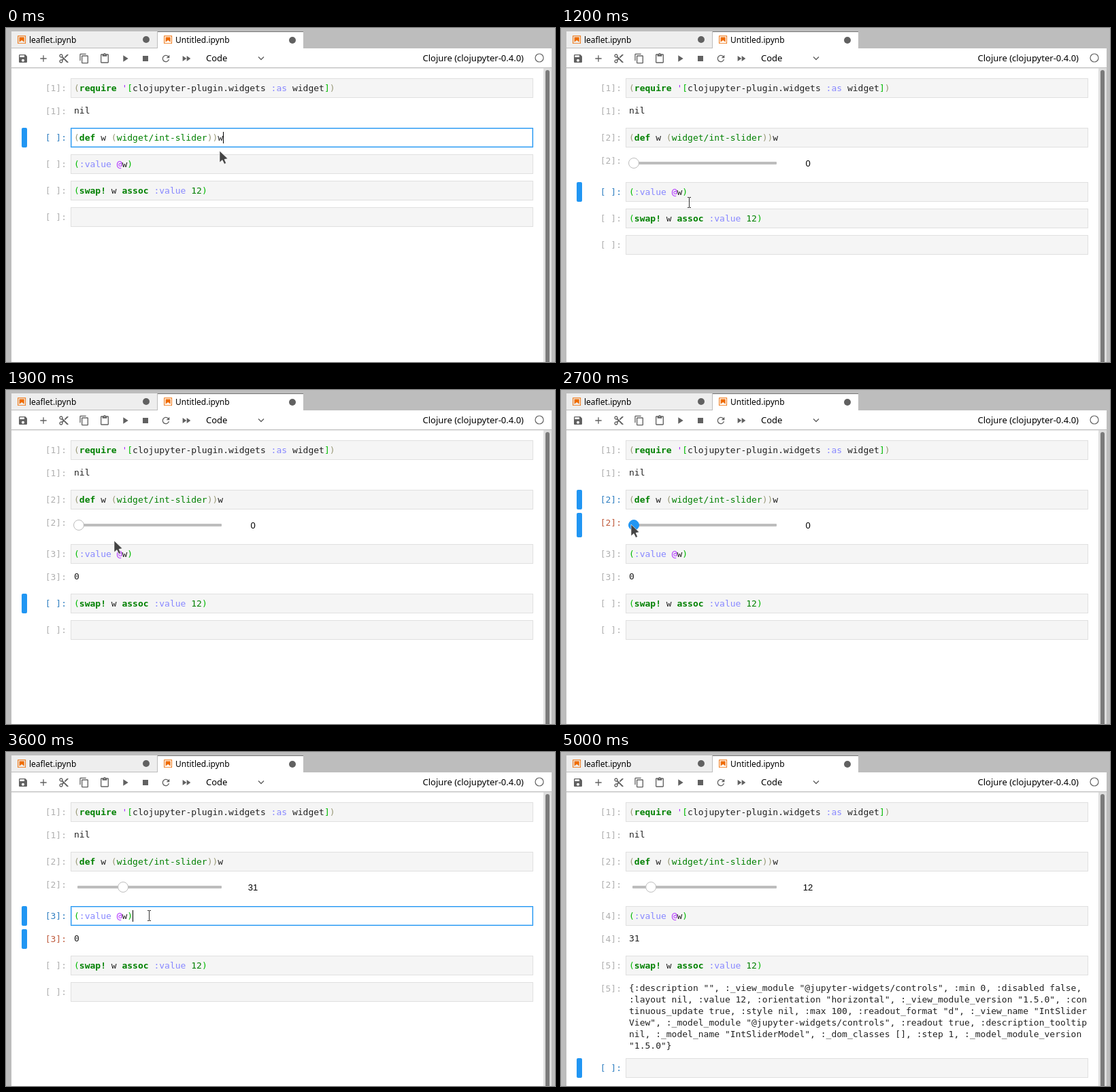
Animation, 807 px wide and 492 px high, one loop 5.1 s. Source, as an HTML page:

```html
<!DOCTYPE html>
<html lang="en">
<head>
<meta charset="utf-8">
<title>Notebook slider</title>
<style>
  html, body { margin: 0; width: 100%; height: 100%; overflow: hidden; background: #bdbdbd; }
  svg { display: block; }
  text { white-space: pre; font: 13px "Noto Sans", sans-serif; }
  .tab { font-size: 12px; }
  .code { font-family: "DejaVu Sans Mono", monospace; fill: #212121; }
  .readout { font-family: "Liberation Sans", Arial, sans-serif; text-anchor: middle; }
  .prompt { text-anchor: end; }
</style>
</head>
<body>
<svg width="807" height="492" viewBox="0 0 807 492">
  <rect width="807" height="492" fill="#bdbdbd"/>
  <rect x="8" y="5" width="214" height="24" fill="#eee"/>
  <rect x="223" y="5" width="214" height="26" fill="#fff"/>
  <rect x="223" y="5" width="214" height="1" fill="#757575"/>
  <rect x="8" y="30" width="794" height="462" fill="#fff"/>
  <rect x="8" y="58" width="794" height="1" fill="#bdbdbd"/>
  <rect x="8" y="59" width="794" height="1" fill="#ececec"/>
  <rect x="790" y="59" width="12" height="433" fill="#dedede"/>
  <rect x="793" y="62" width="6" height="440" rx="3" fill="#7b7b7b"/>
  <text class="tab" x="34" y="22">leaflet.ipynb</text>
  <text class="tab" x="249" y="22">Untitled.ipynb</text>
  <g fill="#616161"><circle cx="206" cy="17" r="5"/><circle cx="421" cy="18" r="5"/></g>
  <text x="294" y="49">Code</text>
  <path d="M371 42.5l4 4 4-4" fill="none" stroke="#616161" stroke-width="1.4"/>
  <text x="761" y="49" text-anchor="end">Clojure (clojupyter-0.4.0)</text>
  <g id="icons" fill="#616161"></g>
  <circle id="kernel" cx="784" cy="44" r="6" stroke="#616161" stroke-width="1.2"/>
  <g id="cells"></g>
  <g id="mouse"></g>
</svg>
<script>
const STEP = 100, STEPS = 51, CHAR = 13 * 1233 / 2048;
const BLUE = '#2196f3';
const $ = id => document.getElementById(id);

const toolbar = [
  'M17 3H5c-1.11 0-2 .9-2 2v14c0 1.1.89 2 2 2h14c1.1 0 2-.9 2-2V7l-4-4zm-5 16c-1.66 0-3-1.34-3-3s1.34-3 3-3 3 1.34 3 3-1.34 3-3 3zm3-10H5V5h10v4z',
  'M19 13h-6v6h-2v-6H5v-2h6V5h2v6h6v2z',
  'M9.64 7.64A4 4 0 1 0 7.64 9.64L10 12l-2.36 2.36A4 4 0 1 0 9.64 16.36L12 14l7 7h3v-1zM6 8a2 2 0 1 1 0-4 2 2 0 0 1 0 4zm0 12a2 2 0 1 1 0-4 2 2 0 0 1 0 4zM19 3l-6 6 2 2 7-7V3z',
  'M16 1H4c-1.1 0-2 .9-2 2v14h2V3h12V1zm3 4H8c-1.1 0-2 .9-2 2v14c0 1.1.9 2 2 2h11c1.1 0 2-.9 2-2V7c0-1.1-.9-2-2-2zm0 16H8V7h11v14z',
  'M19 2h-4.18C14.4.84 13.3 0 12 0c-1.3 0-2.4.84-2.82 2H5c-1.1 0-2 .9-2 2v16c0 1.1.9 2 2 2h14c1.1 0 2-.9 2-2V4c0-1.1-.9-2-2-2zm-7 0c.55 0 1 .45 1 1s-.45 1-1 1-1-.45-1-1 .45-1 1-1zm7 18H5V4h2v3h10V4h2v16z',
  'M8 5v14l11-7z',
  'M6 6h12v12H6z',
  'M17.65 6.35A8 8 0 1 0 19.73 14h-2.08A6 6 0 1 1 16.22 7.78L13 11h7V4z',
  'M4 18l8.5-6L4 6v12zm9-12v12l8.5-6L13 6z'
];
const bookmark = x => `<path fill="#ef6c00" transform="translate(${x} 10) scale(.65)"
  d="M18.7 3.3v15.4H3.3V3.3h15.4m1.5-1.5H1.8v18.3h18.3zM16.5 16.5l-5.4-4.3-5.6 4.3v-11h11z"/>`;
$('icons').innerHTML = toolbar.map((d, i) =>
  `<path transform="translate(${17 + 30 * i} 37) scale(.6667)" d="${d}"/>`).join('') + bookmark(16) + bookmark(231);

// Syntax colours
const ink = (color, extra = '') => s => `<tspan fill="${color}" ${extra}>${s}</tspan>`;
const key = ink('#008000', 'font-weight="bold"'), green = ink('#008000'), atom = ink('#88f');
const paren = ink('#997'), match = ink('#0b0'), meta = ink('#a2f');

const sources = [
  paren('(') + key('require') + ' ' + meta("'") + match('[') + 'clojupyter-plugin.widgets ' + atom(':as') + ' widget' + match(']') + paren(')'),
  paren('(') + key('def') + ' w ' + paren('(') + green('widget/int-slider') + paren('))') + 'w',
  match('(') + atom(':value') + ' ' + meta('@') + 'w' + match(')'),
  match('(') + key('swap!') + ' w ' + key('assoc') + ' ' + atom(':value') + ' ' + green('12') + match(')'),
  ''
];
const lengths = sources.map(s => s.replace(/<[^>]*>/g, '').length);

const widgetState = [
  '{:description "", :_view_module "@jupyter-widgets/controls", :min 0, :disabled false,',
  ':layout nil, :value 12, :orientation "horizontal", :_view_module_version "1.5.0", :con',
  'tinuous_update true, :style nil, :max 100, :readout_format "d", :_view_name "IntSlider',
  'View", :_model_module "@jupyter-widgets/controls", :readout true, :description_tooltip',
  'nil, :_model_name "IntSliderModel", :_dom_classes [], :step 1, :_model_module_version',
  '"1.5.0"}'
];

// Latest value of a [step, value] list
const at = (list, n) => list.filter(([from]) => from <= n).pop()[1];

const selection = [[0, 1], [1, 2], [18, 3], [26, 1], [36, 2], [39, 3], [47, 4]];
const editing = [[0, true], [1, false], [14, true], [18, false], [36, true], [39, false], [46, true], [47, false]];
const prompts = [
  [[0, 1]],
  [[0, ' '], [1, '*'], [2, 2]],
  [[0, ' '], [18, '*'], [19, 3], [39, '*'], [40, 4]],
  [[0, ' '], [47, '*'], [48, 5]],
  [[0, ' ']]
];
const outputs = [
  [[0, ['nil']]],
  [[0, null], [2, 'slider']],
  [[0, null], [19, ['0']], [40, ['31']]],
  [[0, null], [48, widgetState]],
  [[0, null]]
];
const busy = [[0, false], [29, true], [33, false], [47, true], [48, false]];

const path = [
  [0, 314, 181], [1, 314, 181], [6, 253, 239], [9, 172, 248], [10, 176, 259], [12, 188, 257],
  [14, 186, 242], [16, 186, 242], [18, 159, 222], [19, 159, 222], [24, 103, 198], [28, 103, 198],
  [32, 168, 198], [33, 168, 198], [35, 207, 238], [36, 210, 241], [38, 210, 241], [41, 318, 326],
  [42, 324, 314], [47, 324, 314], [48, 324, 317], [49, 173, 219], [50, 173, 219]
];
function mouseAt(n) {
  const i = Math.max(1, path.findIndex(p => p[0] >= n));
  const [a, x, y] = path[i - 1], [b, u, v] = path[i], k = (n - a) / (b - a);
  return [x + (u - x) * k, y + (v - y) * k];
}

const sliderValue = n => n >= 48 ? 12 : Math.round(31 * Math.min(1, Math.max(0, (n - 28) / 4)));

function slider(y, n) {
  const value = sliderValue(n), hot = n >= 24 && n <= 33;
  return `<rect x="105" y="${y + 16}" width="212" height="4" rx="1" fill="#bdbdbd"/>
    <circle cx="${107 + 2.1 * value}" cy="${y + 18}" r="7.5" fill="${hot ? BLUE : '#fff'}" stroke="${hot ? BLUE : '#bdbdbd'}"/>
    <text class="readout" x="363" y="${y + 23}">${value}</text>`;
}

const code = (x, y, s, extra = '') => `<text class="code" x="${x}" y="${y}" ${extra}>${s}</text>`;
const prompt = (y, label, color) =>
  `<text class="code prompt" x="89" y="${y + 19}" style="fill:${color}">[${label}]:</text>`;
const bar = (y, h) => `<rect x="23" y="${y}" width="8" height="${h}" rx="2" fill="${BLUE}"/>`;

function editor(y, focused, chars) {
  const box = (inset, size, fill, stroke, opacity = 1) =>
    `<rect x="${95 + inset}" y="${y + inset}" width="${680 - size}" height="${29 - size}" fill="${fill}" stroke="${stroke}" stroke-opacity="${opacity}"/>`;
  if (!focused) return box(.5, 1, '#f5f5f5', '#e0e0e0');
  return box(.5, 1, '#fff', BLUE) + box(1.5, 3, 'none', BLUE, .4) +
    `<rect x="${Math.round(100 + chars * CHAR)}" y="${y + 6}" width="1" height="17" fill="#000"/>`;
}

function draw(n) {
  const selected = at(selection, n), tops = [];
  let y = 74, html = '';
  sources.forEach((source, i) => {
    const active = i === selected, label = at(prompts[i], n), out = at(outputs[i], n);
    tops.push(y);
    html += editor(y, active && at(editing, n), lengths[i]) + code(100, y + 19, source) +
      prompt(y, label, active ? '#307fc1' : '#b0b0b0');
    if (active) html += bar(y, 29);
    y += 29;
    if (out) {
      y += 5;
      const h = out === 'slider' ? 36 : Math.max(29, 17 * out.length + 5);
      html += prompt(y, label, active ? '#bf5b3d' : '#b0b0b0');
      if (active) html += bar(y, h);
      html += out === 'slider' ? slider(y, n)
        : out.map((line, j) => code(100, y + 18 + 17 * j, line)).join('');
      y += h;
    }
    y += 10;
  });
  $('cells').innerHTML = html;
  $('kernel').setAttribute('fill', at(busy, n) ? '#616161' : '#fff');

  const [mx, my] = mouseAt(n).map(Math.round);
  const overText = tops.some(top => my >= top && my < top + 33);
  $('mouse').setAttribute('transform', `translate(${mx} ${my})`);
  $('mouse').innerHTML = n === STEPS - 1 ? '' : overText
    ? '<path d="M-2 -7.5H0L.5 -7 1 -7.5H3M.5 -7V7M-2 7.5H0L.5 7 1 7.5H3" fill="none" stroke="#333"/>'
    : '<path d="M0 0V17L4 13.5 7 19.5 9.5 18 7 12.5 12 11.5Z" fill="#444" stroke="#fff" stroke-width=".6"/>';
}

let shown = -1;
const start = performance.now();
function tick(now) {
  const n = Math.floor(Math.max(0, now - start) / STEP) % STEPS;
  if (n !== shown) draw(shown = n);
  requestAnimationFrame(tick);
}
tick(start);
</script>
</body>
</html>
```
